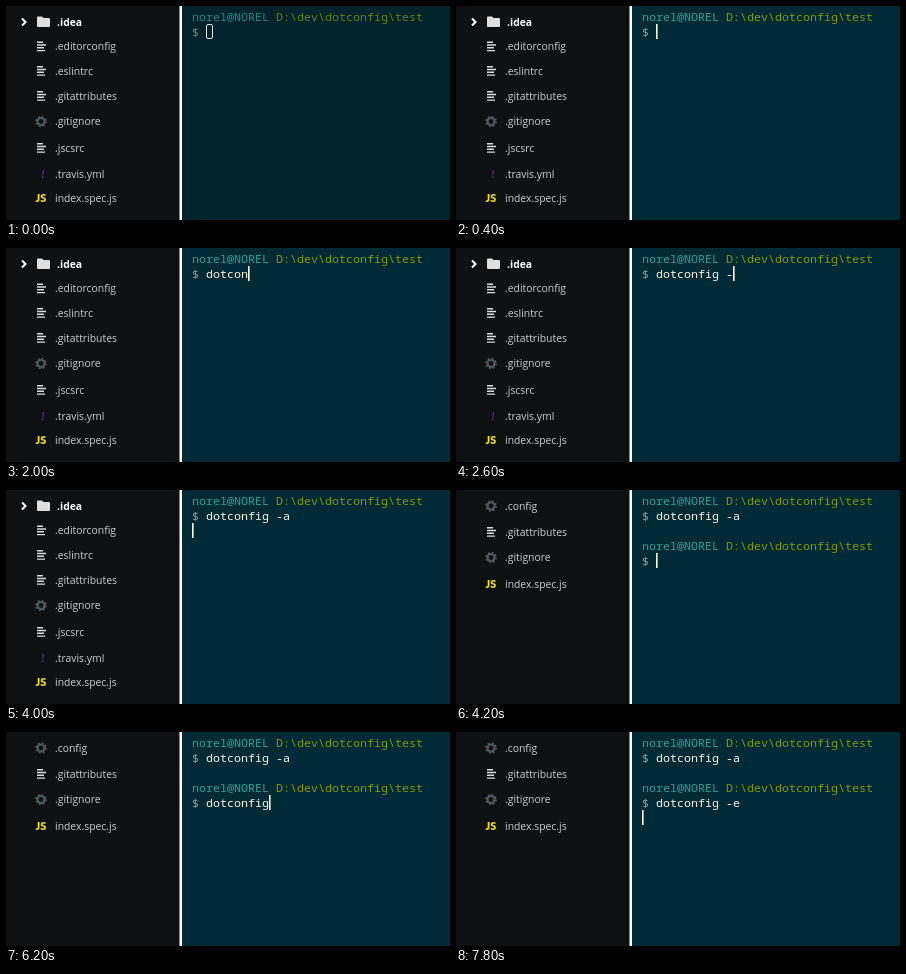
Recreate the animation shown at these times as an HTML page. Size 444 by 214 pixels, loop 8 s.

```html
<!DOCTYPE html>
<html lang="en">
<head>
<meta charset="utf-8">
<title>Terminal and file list</title>
<style>
  html, body { margin: 0; width: 100%; height: 100%; overflow: hidden; background: #0f1012; }
  svg { display: block; width: 444px; height: 214px; }
  text { white-space: pre; font-variant-ligatures: none; }
  .file { font: 10.4px "Open Sans", sans-serif; fill: #cfcfcf; }
  .bold { font-weight: 700; fill: #fff; }
  .js { font: 900 10.8px Lato, sans-serif; fill: #f5de19; }
  .yml { font: italic 700 11px Lato, sans-serif; fill: #5a2ca0; }
  .term { font: 11.667px "Noto Sans Mono", monospace; fill: #fdf6e3; }
  .user { fill: #2aa198; }
  .path { fill: #859900; }
  .sign { fill: #93a1a1; }
</style>
</head>
<body>
<svg viewBox="0 0 444 214">
  <defs>
    <g id="lines" fill="#dcdcdc">
      <path d="M-4-5h6v1.4h-6zM-4-2.2h9v1.4h-9zM-4 .6h7v1.4h-7zM-4 3.4h8v1.4h-8z"/>
    </g>
    <g id="gear" fill="none" stroke="#4d5a5f">
      <circle r="3.5" stroke-width="2.2"/>
      <circle r="5" stroke-width="1.6" stroke-dasharray="1.963 1.963"/>
    </g>
    <g id="folder">
      <path d="M-3-5.500h4l1.500 1.500h5.500q1 0 1 1v7q0 1-1 1h-11q-1 0-1-1v-8.500q0-1 1-1z" fill="#dedede"/>
      <path d="M-19-3.500l3.500 3.500l-3.500 3.500" fill="none" stroke="#fff" stroke-width="2"/>
    </g>
  </defs>
  <rect width="174" height="214" fill="#0f1012"/>
  <g id="before"></g>
  <g id="after"></g>
  <rect id="screen" x="176" width="268" height="214"/>
  <rect x="173.500" width="2.500" height="214" fill="#fff"/>
  <g id="first"></g>
  <g id="second"></g>
  <rect id="idle" x="200.5" y="18.5" width="6" height="14" rx="1.5" fill="none" stroke="#e4e4dc"/>
  <rect id="caret" width="1.6" height="15" fill="#fdf6e3"/>
</svg>
<script>
const LOOP = 8000, CELL = 7, ROW = 15, LEFT = 186, TOP = 3;
const $ = id => document.getElementById(id);

function add(parent, tag, attrs, content) {
  const el = document.createElementNS('http://www.w3.org/2000/svg', tag);
  for (const key in attrs) el.setAttribute(key, attrs[key]);
  if (content) el.textContent = content;
  parent.appendChild(el);
  return el;
}

function addFile(parent, icon, name, y) {
  if (icon === 'js') add(parent, 'text', { class: 'js', x: 29.5, y: y + 3.5 }, 'JS');
  else if (icon === 'yml') add(parent, 'text', { class: 'yml', x: 35.5, y: y + 4 }, '!');
  else add(parent, 'use', { href: '#' + icon, x: 35, y });
  const isFolder = icon === 'folder';
  add(parent, 'text', { class: isFolder ? 'file bold' : 'file', x: isFolder ? 51 : 49, y: y + 3.5 }, name);
}

[['folder', '.idea', 16], ['lines', '.editorconfig', 40.5], ['lines', '.eslintrc', 65],
 ['lines', '.gitattributes', 90], ['gear', '.gitignore', 115.5], ['lines', '.jscsrc', 142],
 ['yml', '.travis.yml', 168], ['js', 'index.spec.js', 192.5]
].forEach(f => addFile($('before'), ...f));

[['gear', '.config', 16], ['lines', '.gitattributes', 42],
 ['gear', '.gitignore', 67.5], ['js', 'index.spec.js', 94]
].forEach(f => addFile($('after'), ...f));

// Prompt over two rows; returns the element that holds the typed command.
function addPrompt(parent, row) {
  const y = TOP + row * ROW + 12;
  const put = (cls, col, dy, str) =>
    add(parent, 'text', { class: 'term ' + cls, x: LEFT + col * CELL, y: y + dy }, str);
  put('user', 0, 0, 'norel@NOREL');
  put('path', 12, 0, 'D:\\dev\\dotconfig\\test');
  put('sign', 0, ROW, '$');
  return put('', 2, ROW, '');
}

// keys: [time, characters typed so far]
const commands = [
  { text: 'dotconfig -a', row: 0, enter: 4000,
    keys: [[1200, 1], [1400, 2], [1600, 3], [1800, 5], [2000, 6], [2200, 8], [2400, 9], [2600, 11], [3000, 12]] },
  { text: 'dotconfig -e', row: 3, enter: 7800,
    keys: [[5200, 1], [5400, 3], [5800, 5], [6000, 7], [6200, 9], [6800, 11], [7000, 12]] }
];
commands[0].el = addPrompt($('first'), 0);
commands[1].el = addPrompt($('second'), 3);

const FOCUS = 400, DONE = 4200;
const blinks = [[800, 1200], [3600, 4000], [4600, 5200], [7600, 7800]];
const show = (el, on) => el.setAttribute('visibility', on ? 'visible' : 'hidden');

function typed(cmd, t) {
  return cmd.keys.reduce((n, [at, count]) => t >= at ? count : n, 0);
}

function draw(t) {
  const done = t >= DONE, focused = t >= FOCUS;
  show($('before'), !done);
  show($('after'), done);
  show($('second'), done);
  show($('idle'), !focused);
  $('screen').setAttribute('fill', focused ? '#002b36' : '#00232c');
  $('first').setAttribute('opacity', focused ? 1 : 0.8);

  for (const cmd of commands) cmd.el.textContent = cmd.text.slice(0, typed(cmd, t));

  const cmd = commands[done ? 1 : 0], entered = t >= cmd.enter;
  const col = entered ? 0 : 2 + typed(cmd, t);
  $('caret').setAttribute('x', LEFT + col * CELL);
  $('caret').setAttribute('y', TOP + (cmd.row + (entered ? 2 : 1)) * ROW);
  show($('caret'), focused && !blinks.some(([off, on]) => t >= off && t < on));
}

const start = performance.now();
function tick() {
  draw((performance.now() - start) % LOOP);
  requestAnimationFrame(tick);
}
tick();
</script>
</body>
</html>
```
